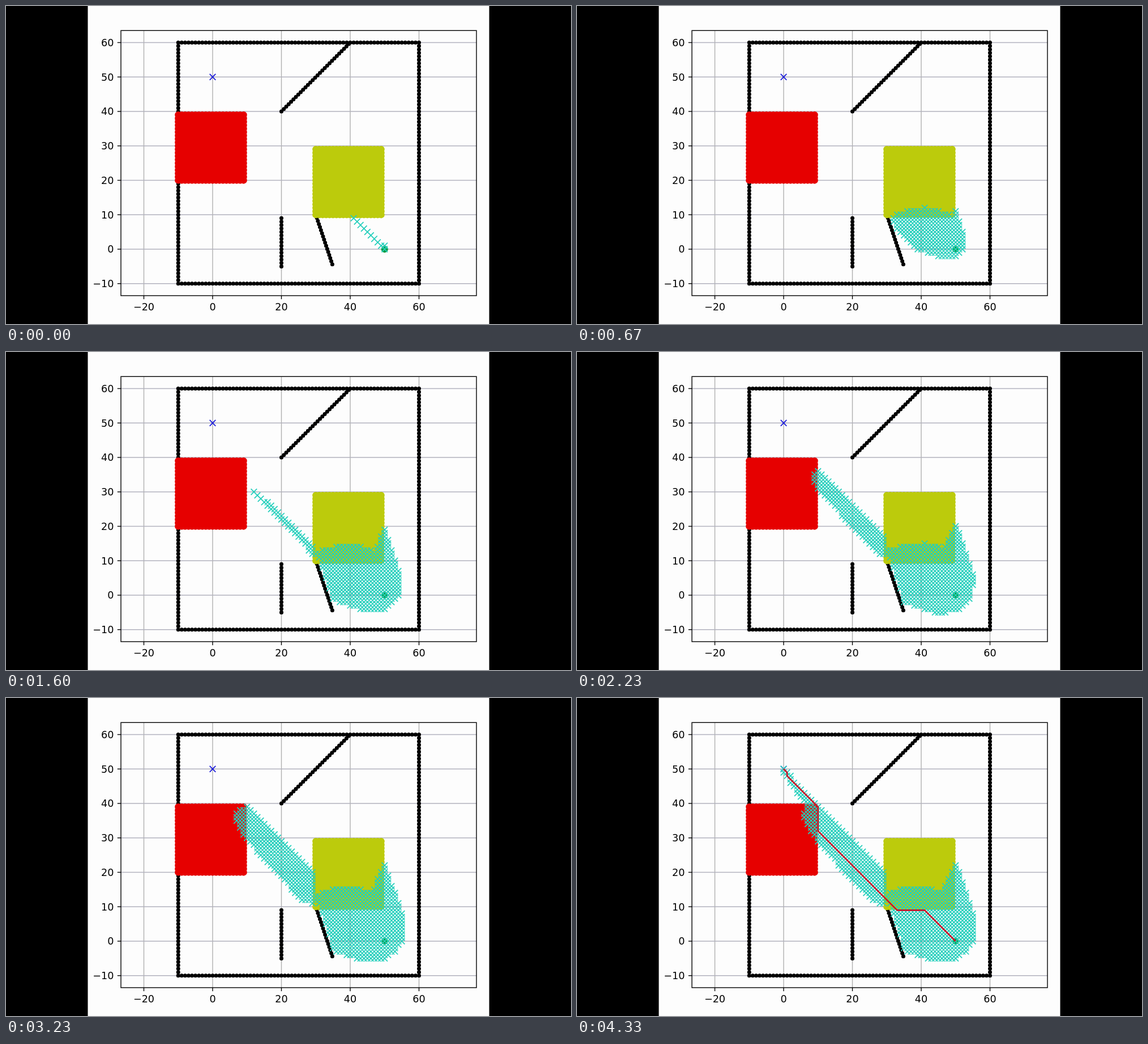
An HTML page with a canvas that plays this animation: 998x561 px, repeating every 4.36 s.

```html
<!DOCTYPE html>
<html lang="en">
<head>
<meta charset="utf-8">
<title>Grid path search</title>
<style>
  html, body { margin: 0; width: 100%; height: 100%; overflow: hidden; background: #000; }
  canvas { display: block; width: 998px; height: 561px; }
</style>
</head>
<body>
<canvas id="stage" width="998" height="561"></canvas>
<script>
const W = 998, H = 561, LOOP = 4360, END = 3560;
const UNIT = 6.075, PT = 1.758;
const START = [50, 0], GOAL = [0, 50];
const ROUTE = [[50, 0], [41, 9], [33, 9], [10, 32], [10, 39], [1, 48], [1, 49], [0, 50]];
const X = x => 365 + x * UNIT;
const Y = y => 429 - y * UNIT;

function range(from, to, step = 1) {
  const out = [];
  for (let i = 0; from + i * step < to - 1e-9; i++) out.push(from + i * step);
  return out;
}

const walls = [
  ...range(-10, 61).flatMap(i => [[i, -10], [i, 60], [-10, i], [60, i]]),
  ...range(-5, 10).map(y => [20, y]),
  ...range(20, 40, 0.7).map(x => [x, x + 20]),
  ...range(30, 35, 0.3).map(x => [x, 100 - 3 * x])
];

// Square zones that make each move more expensive
const zones = [
  { x: -10, y: 20, extra: 0.2, color: '#e60000' },
  { x: 30, y: 10, extra: 1, color: '#bccb0c' }
];
const inZone = (z, x, y) => x >= z.x && x < z.x + 20 && y >= z.y && y < z.y + 20;

// A* search; returns the cells in the order they are visited
function search() {
  const D = Math.SQRT2;
  const moves = [[1, 0, 1], [0, 1, 1], [-1, 0, 1], [0, -1, 1],
                 [-1, -1, D], [-1, 1, D], [1, -1, D], [1, 1, D]];
  const id = (x, y) => (y + 10) * 71 + x + 10;
  const rest = (x, y) => Math.hypot(GOAL[0] - x, GOAL[1] - y);
  const shut = new Set();
  for (const x of range(-10, 61))
    for (const y of range(-10, 61))
      if (walls.some(w => Math.hypot(w[0] - x, w[1] - y) <= 1)) shut.add(id(x, y));

  const node = (x, y, cost) => ({ x, y, cost, total: cost + rest(x, y) });
  const open = new Map([[id(...START), node(...START, 0)]]);
  const visited = [];
  while (open.size) {
    let best = null;
    for (const n of open.values()) if (!best || n.total < best.total) best = n;
    visited.push(best);
    if (best.x === GOAL[0] && best.y === GOAL[1]) break;
    const key = id(best.x, best.y);
    open.delete(key);
    shut.add(key);
    for (const [dx, dy, len] of moves) {
      const x = best.x + dx, y = best.y + dy, k = id(x, y);
      if (shut.has(k)) continue;
      let cost = best.cost + len;
      for (const z of zones) if (inZone(z, x, y)) cost += z.extra * len;
      const old = open.get(k);
      if (!old || old.cost > cost) open.set(k, node(x, y, cost));
    }
  }
  return visited;
}

const visited = search();
const rank = (x, y) => visited.findIndex(n => n.x === x && n.y === y);
// Time at which the search reaches a given cell
const pace = [
  [0, 0],
  [670, rank(45, 11)],
  [1600, rank(12, 30)],
  [2230, rank(9, 35)],
  [2800, rank(9, 37)],
  [END, visited.length - 1]
];

function shown(t) {
  if (t >= END) return visited.length;
  const i = pace.findIndex(p => p[0] > t);
  const [t0, a] = pace[i - 1], [t1, b] = pace[i];
  const n = a + (b - a) * (t - t0) / (t1 - t0);
  return Math.min(visited.length, 10 * Math.ceil(n / 10 - 1e-6) + 1);
}

function dots(g, points, r, color) {
  g.fillStyle = color;
  g.beginPath();
  for (const [x, y] of points) {
    g.moveTo(X(x) + r, Y(y));
    g.arc(X(x), Y(y), r, 0, 7);
  }
  g.fill();
}

function crosses(g, points, color) {
  const r = 3 * PT;
  g.strokeStyle = color;
  g.lineWidth = PT;
  g.beginPath();
  for (const { x, y } of points) {
    const px = X(x), py = Y(y);
    g.moveTo(px - r, py - r); g.lineTo(px + r, py + r);
    g.moveTo(px - r, py + r); g.lineTo(px + r, py - r);
  }
  g.stroke();
}

function line(g, x0, y0, x1, y1, color) {
  g.strokeStyle = color;
  g.beginPath();
  g.moveTo(x0, y0);
  g.lineTo(x1, y1);
  g.stroke();
}

function drawChart(g) {
  const L = 203, R = 831, T = 43.3, B = 511;
  const label = v => String(v).replace('-', '\u2212');
  g.fillStyle = '#000';
  g.fillRect(0, 0, W, H);
  g.fillStyle = '#fdfdfd';
  g.fillRect(144.5, 0, 709, H);

  g.font = '17.6px "DejaVu Sans", sans-serif';
  g.fillStyle = '#000';
  g.lineWidth = 1.4;
  g.textAlign = 'center';
  for (const v of range(-20, 61, 20)) {
    line(g, X(v), T, X(v), B, '#b0b0b0');
    line(g, X(v), B, X(v), B + 6.2, '#000');
    g.fillText(label(v), X(v), 537);
  }
  g.textAlign = 'right';
  for (const v of range(-10, 61, 10)) {
    line(g, L, Y(v), R, Y(v), '#b2b2be');
    line(g, L - 6.2, Y(v), L, Y(v), '#000');
    g.fillText(label(v), 190.5, Y(v) + 6.4);
  }

  dots(g, walls, 2 * PT, '#000');
  for (const z of zones) {
    const cells = range(0, 400).map(i => [z.x + i % 20, z.y + Math.floor(i / 20)]);
    dots(g, cells, 3.5 * PT, z.color);
  }
  dots(g, [START], 3.5 * PT, '#0a9a40');
  crosses(g, [{ x: GOAL[0], y: GOAL[1] }], '#1c1cd8');
  g.strokeStyle = '#000';
  g.lineWidth = 1.4;
  g.strokeRect(L, T, R - L, B - T);
}

function drawRoute(g) {
  g.strokeStyle = '#cc1226';
  g.lineWidth = 1.5 * PT;
  g.lineJoin = 'round';
  g.beginPath();
  for (const [x, y] of ROUTE) g.lineTo(X(x), Y(y));
  g.stroke();
}

const chart = document.createElement('canvas');
chart.width = W;
chart.height = H;
drawChart(chart.getContext('2d'));

const ctx = document.getElementById('stage').getContext('2d');
const begin = performance.now();

function frame() {
  const t = Math.max(0, performance.now() - begin) % LOOP;
  ctx.drawImage(chart, 0, 0);
  crosses(ctx, visited.slice(0, shown(t)), '#24cfbc');
  if (t >= END) drawRoute(ctx);
  requestAnimationFrame(frame);
}
frame();
</script>
</body>
</html>
```
